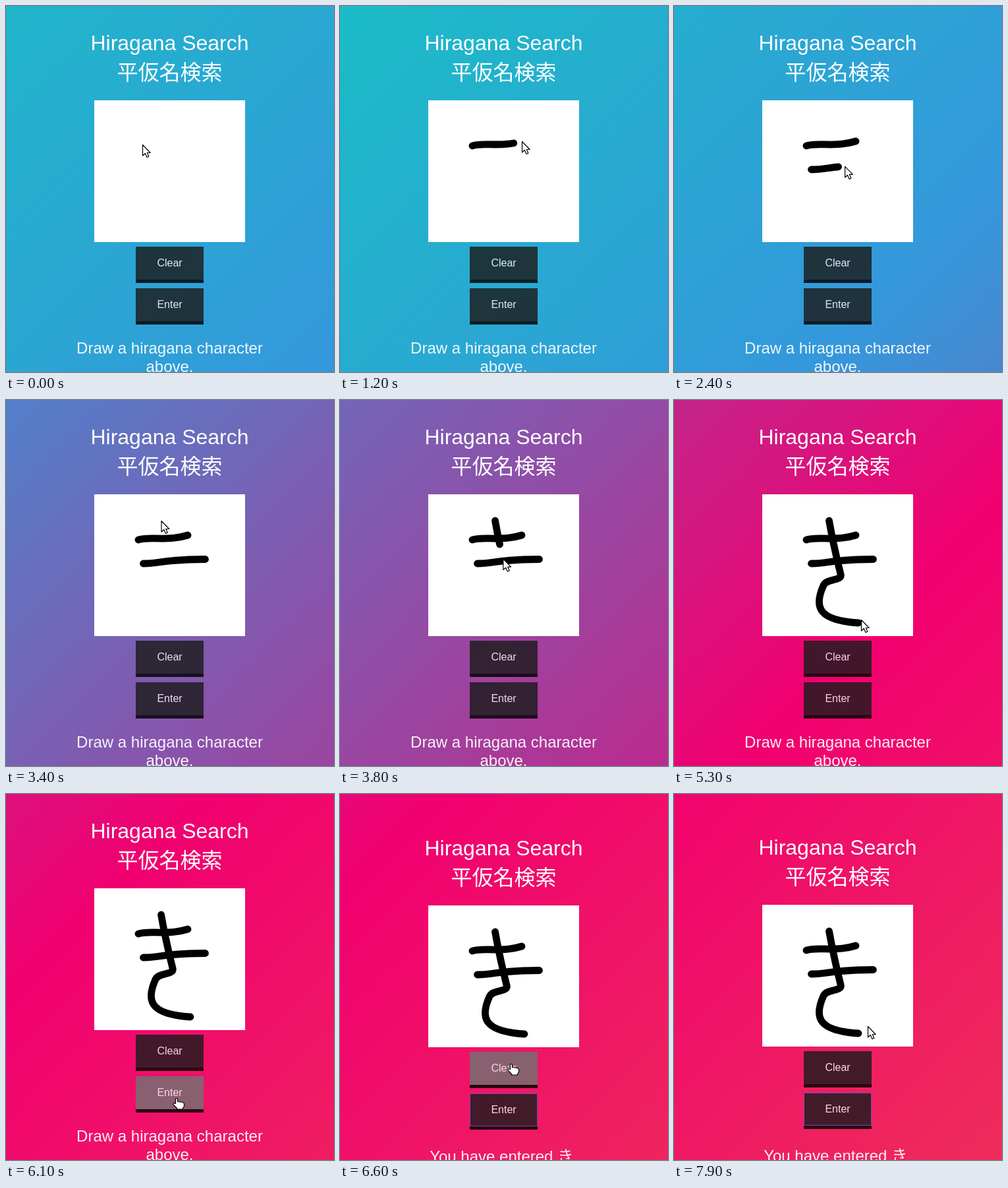
An HTML page for the animation above (8 s loop, 498x555 px).

```html
<!DOCTYPE html>
<html lang="ja">
<head>
<meta charset="utf-8">
<title>Hiragana Search</title>
<style>
  html, body { margin: 0; width: 100%; height: 100%; overflow: hidden; }
  body { position: relative; color: #fff; font-family: "Liberation Sans", "Noto Sans CJK JP", sans-serif; }
  body * { position: absolute; box-sizing: border-box; }
  svg { left: 0; top: 0; width: 498px; height: 555px; }
  #sky { left: -434px; top: 0; width: 1366px; height: 650px;
    background: linear-gradient(135deg, rgb(0,228,176), rgb(52,152,219), rgb(241,0,112), rgb(234,106,60)) 0 50% / 400% 400%; }
  #page { left: 0; top: 0; width: 497px; height: 700px; }
  .title, .message { width: 100%; text-align: center; white-space: pre; }
  .title { font-size: 32px; line-height: 40px; }
  .message { font-size: 24px; line-height: 27px; opacity: .93; }
  #paper { left: 134px; top: 143px; width: 229px; height: 215px; background: #fff; }
  .button { left: 197px; width: 103px; height: 55px; padding-top: 16px; border-bottom: 5px solid #000;
    background: #1c1c1c; opacity: .82; font-size: 16px; line-height: 17px; text-align: center; }
  .button.hover { background: #727272; }
  .button.focus { box-shadow: inset 0 0 0 1px #5c4fd0; }
  #ink path { fill: none; stroke: #000; stroke-width: 10.8; stroke-linecap: round; stroke-linejoin: round; }
  #pointer path { fill: #fff; stroke: #000; stroke-width: 1.2; stroke-linejoin: round; }
</style>
</head>
<body>
<div id="sky"></div>
<div id="page">
  <div class="title" style="top:36px">Hiragana Search</div>
  <div class="title" style="top:81px">平仮名検索</div>
  <div id="paper"></div>
  <svg id="ink">
    <path d="M201 212C216 206 244 215 276 205"/>
    <path d="M208.500 248C235 248 240 241.500 302.500 241.500"/>
    <path d="M235.500 183Q242 220 253 264C256 275 232 270 227 281C214 310 214 334 280 338"/>
  </svg>
  <div class="button" style="top:365px">Clear</div>
  <div class="button" style="top:428px" id="enter">Enter</div>
  <div id="prompt" style="width:100%">
    <div class="message" style="top:505px">Draw a hiragana character</div>
    <div class="message" style="top:533px">above.</div>
  </div>
  <div id="answer" class="message" style="top:510px">You have entered き </div>
</div>
<svg>
  <g id="pointer">
    <path d="M0 0V16.500L3.800 13L6.500 19L9.300 17.700L6.800 12H11.700Z"/>
    <path d="M-2 8V1Q-.5 -1 1 1V5L9 6Q11 7 11 9V12L9 15V16.500H0V15L-5 10Q-6 7.500 -4 7Z"/>
  </g>
</svg>
<script>
const LOOP = 8000, LEAD = 150, CLICK = 6300, ANSWER = 6400;
const $ = id => document.getElementById(id);
const show = (el, on) => el.style.display = on ? '' : 'none';
const clamp = v => Math.min(1, Math.max(0, v));

// The screen refreshes every 100 ms, with one long stall.
const snap = t => t > 2400 && t < 3400 ? 2400 : Math.floor(t / 100) * 100;

// CSS "ease", solved by bisection
function ease(x) {
  const bez = (u, a, b) => 3 * u * (1 - u) ** 2 * a + 3 * u * u * (1 - u) * b + u ** 3;
  let lo = 0, hi = 1;
  for (let i = 0; i < 24; i++) {
    const mid = (lo + hi) / 2;
    if (bez(mid, .25, .25) < x) lo = mid; else hi = mid;
  }
  return bez(lo, .1, 1);
}

const [first, second, third] = $('ink').children;
const strokes = [[first, 450, 1350], [second, 1740, 3240], [third, 3550, 5030]]
  .map(([path, start, end]) => ({ path, start, end, length: path.getTotalLength() }));
const drawn = (s, t) => clamp((t - s.start) / (s.end - s.start));
const pointOn = (s, t) => {
  const p = s.path.getPointAtLength(s.length * drawn(s, t));
  return [p.x, p.y];
};

// The pointer leads the ink and glides between strokes, then visits Enter and Clear.
const stops = [
  [0, 207, 210],
  ...strokes.flatMap(s => [s.start, s.end].map(t => [t - LEAD, ...pointOn(s, t)])),
  [5300, 284, 333], [6100, 259, 461], [ANSWER, 259, 461], [6600, 260, 409], [7900, 294, 352]
];

function pointerAt(t) {
  const s = strokes.find(s => t + LEAD > s.start && t + LEAD < s.end);
  if (s) return pointOn(s, t + LEAD);
  const i = stops.findLastIndex(stop => stop[0] <= t);
  const [t0, x0, y0] = stops[i], [t1, x1, y1] = stops[i + 1] || [LOOP, x0, y0];
  const k = ease((t - t0) / (t1 - t0));
  return [x0 + (x1 - x0) * k, y0 + (y1 - y0) * k];
}

function render(now) {
  const t = snap(now % LOOP);
  const entered = t >= ANSWER;
  const shift = t >= 7900 ? 25 : entered ? 26 : 0;

  const phase = (t - 1500) / 7500;
  const slide = phase < 0 ? 1 - ease(1 + phase * 1.5) : ease(phase);
  $('sky').style.backgroundPosition = `${slide * 100}% 50%`;

  $('page').style.top = shift + 'px';
  show($('prompt'), !entered);
  show($('answer'), entered);
  $('enter').classList.toggle('focus', t >= CLICK);

  for (const s of strokes) {
    const p = drawn(s, t);
    show(s.path, p > 0);
    s.path.style.strokeDasharray = p < 1 ? `${s.length * p} 999` : 'none';
  }

  const [x, y] = pointerAt(t);
  let over = false;
  for (const button of document.querySelectorAll('.button')) {
    const top = button.offsetTop + shift;
    const hit = x > 197 && x < 300 && y > top && y < top + 55;
    button.classList.toggle('hover', hit);
    over ||= hit;
  }
  const [arrow, hand] = $('pointer').children;
  show(arrow, !over);
  show(hand, over);
  $('pointer').setAttribute('transform', `translate(${x + .5} ${y + .5})`);
}

const began = performance.now();
(function tick() {
  render(performance.now() - began);
  requestAnimationFrame(tick);
})();
</script>
</body>
</html>
```
